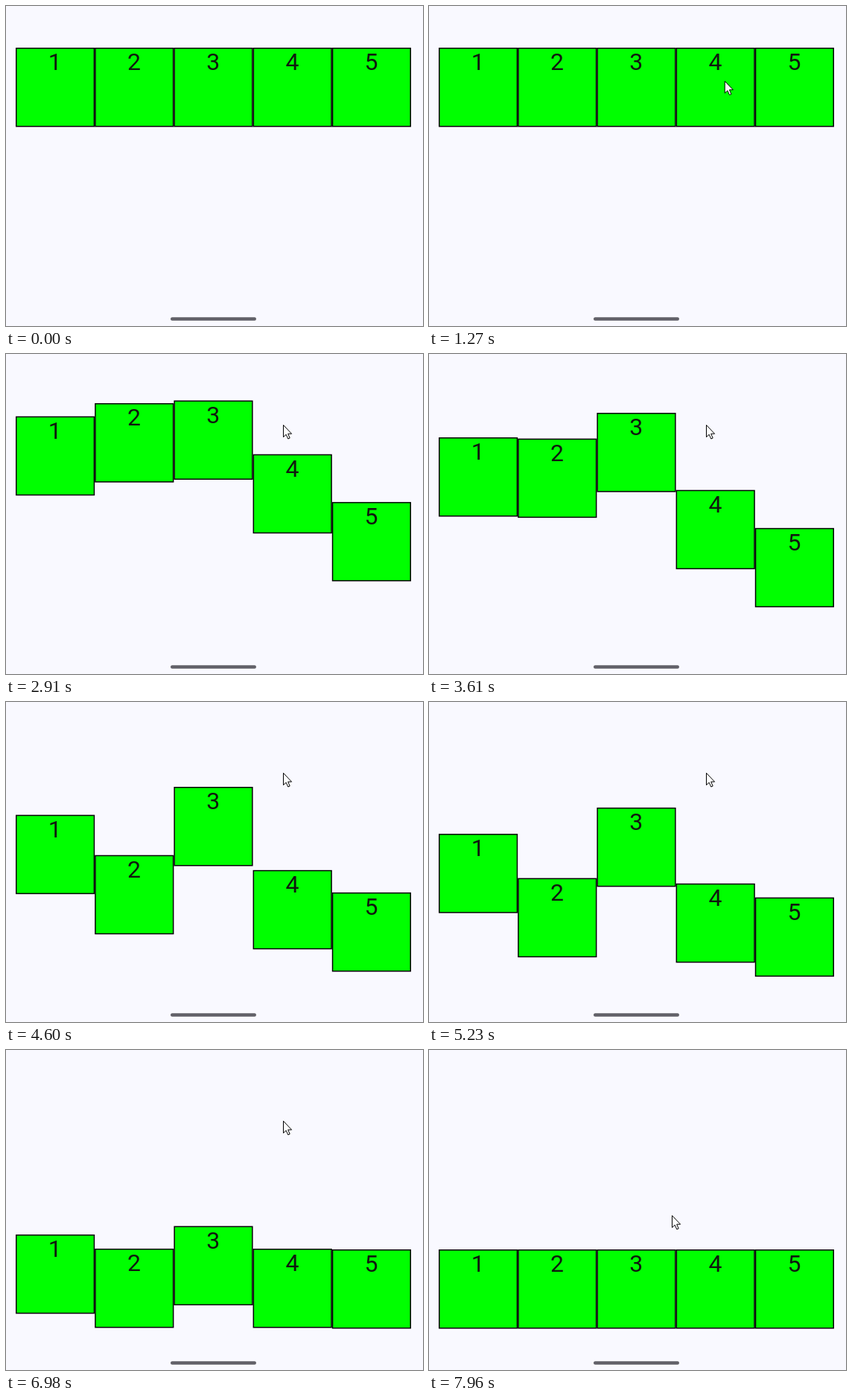
Write an HTML page that moves like this. It is 560x430 px and loops after 8 s.

```html
<!DOCTYPE html>
<html lang="en">
<head>
<meta charset="utf-8">
<title>Easing comparison</title>
<style>
  html, body { margin: 0; width: 100%; height: 100%; overflow: hidden; background: #f9f9ff; }
  svg { display: block; width: 560px; height: 430px; }
  .box rect { fill: #0f0; stroke: #000; stroke-width: 1.5; }
  .box text { font: 32px Roboto, sans-serif; fill: #10180f; text-anchor: middle; }
</style>
</head>
<body>
<svg id="stage" viewBox="0 0 560 430">
  <defs>
    <radialGradient id="glow">
      <stop offset="0" stop-color="#001008" stop-opacity=".12"/>
      <stop offset=".7" stop-color="#001008" stop-opacity=".09"/>
      <stop offset="1" stop-color="#001008" stop-opacity="0"/>
    </radialGradient>
  </defs>
  <rect width="560" height="430" fill="#f9f9ff"/>
  <g id="boxes"></g>
  <rect x="221" y="418.3" width="115" height="4.4" rx="2.2" fill="#626168"/>
  <circle id="press" cx="372" cy="95" r="12" fill="#ff0" fill-opacity=".47"/>
  <path id="cursor" d="M.5 .5V16.6L4.2 13.2L6.8 19L9.2 18L6.7 12.2H11.6Z"
        fill="#fff" stroke="#000" stroke-width="1"/>
</svg>
<script>
const LOOP = 8000, START = 2222, DURATION = 5250;
const TOP = 56, TRAVEL = 212, WIDTH = 106.2, HEIGHT = 106.5;
const NS = "http://www.w3.org/2000/svg";
const $ = id => document.getElementById(id);

const clamp = v => Math.min(1, Math.max(0, v));
const progress = (t, from, to) => clamp((t - from) / (to - from));
const lerp = (a, b, p) => a + (b - a) * p;
const easeOut = p => 1 - (1 - p) ** 2;
const hold = (t, base, step) => base + Math.floor((t - base) / step) * step;

function bezier(x1, y1, x2, y2) {
  const at = (s, a, b) => 3 * s * (1 - s) ** 2 * a + 3 * s * s * (1 - s) * b + s ** 3;
  return x => {
    if (x <= 0 || x >= 1) return clamp(x);
    let lo = 0, hi = 1;
    for (let i = 0; i < 30; i++) {
      const mid = (lo + hi) / 2;
      if (at(mid, x1, x2) < x) lo = mid; else hi = mid;
    }
    return at(lo, y1, y2);
  };
}

const easings = [
  p => p,
  bezier(.4, 0, .2, 1),
  bezier(.4, 0, 1, 1),
  bezier(0, 0, .2, 1),
  bezier(0, 1, .5, 1)
];

function add(parent, tag, attrs) {
  const el = document.createElementNS(NS, tag);
  for (const key in attrs) el.setAttribute(key, attrs[key]);
  return parent.appendChild(el);
}

const boxes = easings.map((ease, i) => {
  const el = add($("boxes"), "g", { class: "box" });
  add(el, "rect", { x: .75, y: .75, width: WIDTH - 1.5, height: HEIGHT - 1.5 });
  add(el, "text", { x: WIDTH / 2 - .3, y: 30.3 }).textContent = i + 1;
  return { el, ease, x: 13 + WIDTH * i };
});
const ripple = add(boxes[3].el, "circle", { cx: WIDTH / 2, cy: HEIGHT / 2, fill: "url(#glow)" });

function moveCursor(t, tick) {
  const enter = easeOut(progress(hold(t, 920, 70), 920, 1480));
  const leave = easeOut(progress(tick, 7110, 7960));
  const x = lerp(lerp(548, 372, enter), 326, leave);
  const y = lerp(lerp(134, 95, enter), 222, leave);
  $("cursor").setAttribute("transform", `translate(${x} ${y})`);
  $("cursor").setAttribute("visibility", t < 920 ? "hidden" : "visible");
}

function draw(t) {
  const tick = hold(t, 2277, 70.12);
  const p = progress(tick, START, START + DURATION);
  for (const { el, ease, x } of boxes)
    el.setAttribute("transform", `translate(${x} ${TOP + TRAVEL * ease(p)})`);

  ripple.setAttribute("r", lerp(34, 53, progress(tick, 2200, 2277)));
  ripple.setAttribute("opacity", tick < 2200 ? 0 : 1 - progress(tick, 2290, 2480));
  $("press").setAttribute("visibility", t >= 2080 && t < 2220 ? "visible" : "hidden");
  moveCursor(t, tick);
}

const origin = performance.now();
function frame() {
  draw((performance.now() - origin) % LOOP);
  requestAnimationFrame(frame);
}
frame();
</script>
</body>
</html>
```
